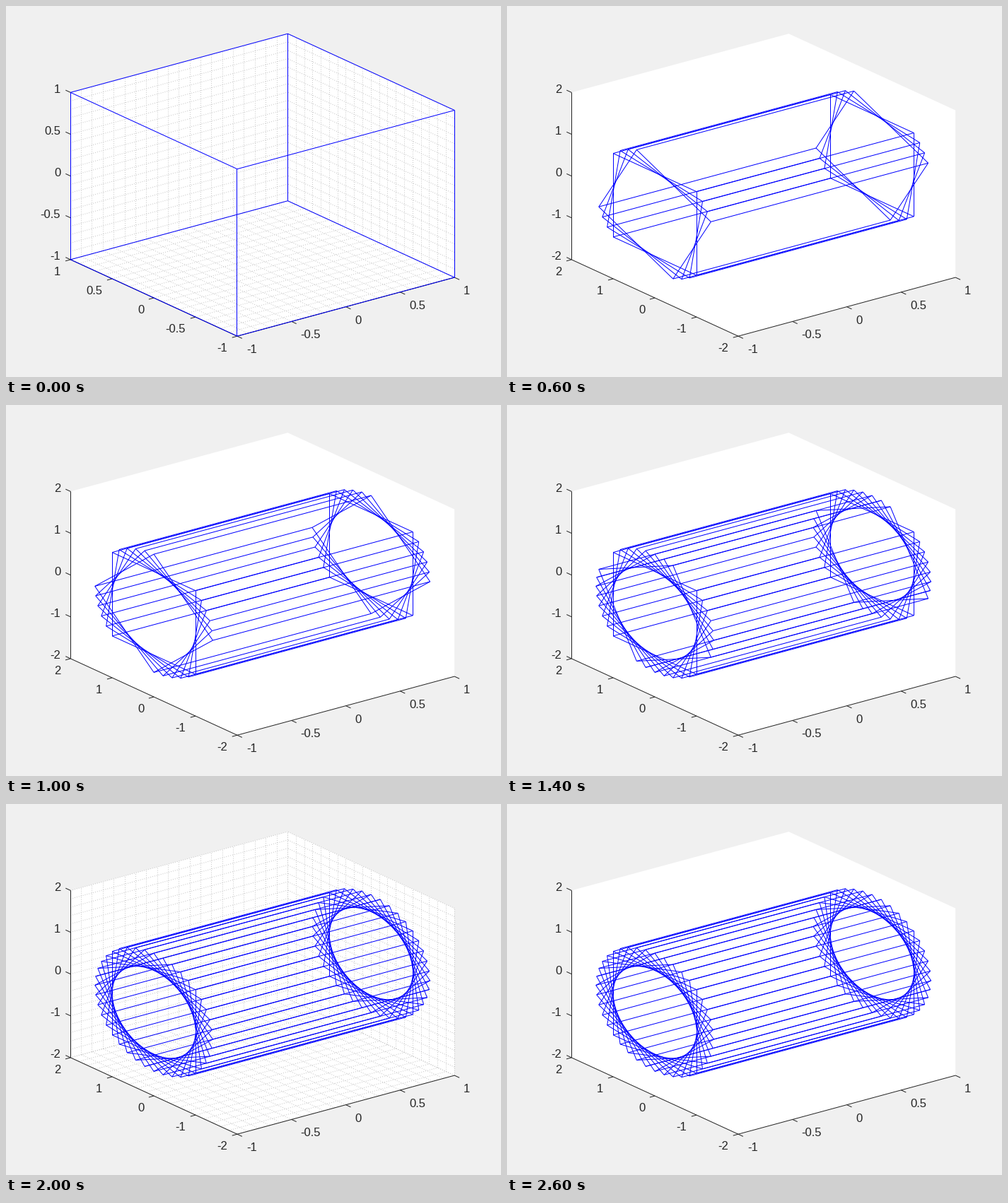
Write a matplotlib script that moves like this. It is 700x525 px and loops after 2800 ms.

```python
import itertools

import matplotlib.pyplot as plt
import numpy as np
from matplotlib.animation import FuncAnimation
from matplotlib.collections import LineCollection

W, H, DPI = 700, 525, 100
FRAMES, INTERVAL = 14, 200
PX = 72 / DPI
STEP = np.radians(9)
INK, BLUE, PAPER = "#262626", "#0000ff", "#f0f0f0"

# Orthographic view of a unit box, stretched to fill the plot area
LEFT, TOP, WIDTH, HEIGHT = 91.2, 39.2, 543.0, 428.0
AZ, EL = np.radians(-37.5), np.radians(30)
right = np.array([np.cos(AZ), np.sin(AZ), 0])
up = np.array([-np.sin(AZ) * np.sin(EL), np.cos(AZ) * np.sin(EL), np.cos(EL)])
right *= WIDTH / np.abs(right).sum()
up *= HEIGHT / up.sum()
VIEW = np.column_stack([right, -up])
ORIGIN = np.array([LEFT - right[1], TOP + HEIGHT])


def project(points):
    """Unit box coordinates to stage pixels."""
    return ORIGIN + np.asarray(points, float) @ VIEW


def crisp(segments):
    """Centre vertical segments on a pixel column."""
    segs = np.array(segments, float)
    vertical = np.isclose(segs[:, 0, 0], segs[:, 1, 0])
    segs[vertical, :, 0] = np.floor(segs[vertical, :, 0]) + 0.5
    return segs


def lines(segments, color, **kw):
    col = LineCollection(segments, colors=color, linewidths=PX, **kw)
    col.set_snap(False)
    ax.add_collection(col)
    return col


def grid_segments():
    segs = []
    for t in np.linspace(0, 1, 21):
        segs += [
            [(t, 0, 0), (t, 1, 0)], [(0, t, 0), (1, t, 0)],
            [(t, 1, 0), (t, 1, 1)], [(0, 1, t), (1, 1, t)],
            [(1, t, 0), (1, t, 1)], [(1, 0, t), (1, 1, t)],
        ]
    return crisp(project(segs))


def axis_segments():
    segs = list(project([
        [(0, 0, 0), (1, 0, 0)],
        [(0, 0, 0), (0, 1, 0)],
        [(0, 1, 0), (0, 1, 1)],
    ]))
    for t in np.linspace(0, 1, 5):
        for start, step in (((t, 0, 0), (6.9, 3.2)),
                            ((0, t, 0), (-7.2, 2.0)),
                            ((0, 1, t), (-6.9, -3.2))):
            p = project(start)
            segs.append([p, p + step])
    return crisp(segs)


CORNERS = np.array(list(itertools.product((-1, 1), repeat=3)), float)
EDGES = [(a, b) for a, b in itertools.combinations(range(8), 2)
         if np.abs(CORNERS[a] - CORNERS[b]).sum() == 2]


def cube_segments(angle, limit):
    """Edges of the cube turned about x, with y and z spanning +-limit."""
    c, s = np.cos(angle), np.sin(angle)
    x, y, z = CORNERS.T
    turned = np.column_stack([x, c * y - s * z, s * y + c * z])
    pts = project((turned / [1, limit, limit] + 1) / 2)
    return crisp([pts[list(edge)] for edge in EDGES])


fig = plt.figure(figsize=(W / DPI, H / DPI), dpi=DPI, facecolor=PAPER)
ax = fig.add_axes([0, 0, 1, 1])
ax.set(xlim=(0, W), ylim=(H, 0))
ax.axis("off")

walls = project([(0, 0, 0), (1, 0, 0), (1, 0, 1),
                 (1, 1, 1), (0, 1, 1), (0, 1, 0)])
ax.fill(*walls.T, color="white", lw=0)
grid = lines(grid_segments(), "#c6c6c6", linestyles=[(0, (1, 2))], zorder=2)
lines(axis_segments(), INK, zorder=3)
cubes = lines([], BLUE, zorder=4)


def label_row(x, y, dx, dy, ha):
    return [ax.text(x + dx * i, y + dy * i, "", ha=ha, va="baseline",
                    family="Liberation Sans", size=12, color=INK)
            for i in range(5)]


x_labels = label_row(339.8, 491.2, 76.8, -20.8, "left")
y_labels = label_row(313, 489.4, -58.9, -27.1, "right")
z_labels = label_row(77.2, 359.4, 0, -59.1, "right")


def set_labels(row, limit):
    for text, value in zip(row, np.linspace(-limit, limit, 5)):
        text.set_text(f"{value:g}")


def update(frame):
    limit = 1 if frame == 0 else 2
    set_labels(x_labels, 1)
    set_labels(y_labels, limit)
    set_labels(z_labels, limit)
    grid.set_visible(frame % 2 == 0)
    # A full quarter turn lands on the first cube again
    turns = range(min(frame + 1, 10))
    cubes.set_segments([seg for k in turns
                        for seg in cube_segments(k * STEP, limit)])
    return [grid, cubes, *x_labels, *y_labels, *z_labels]


anim = FuncAnimation(fig, update, frames=FRAMES, interval=INTERVAL,
                     repeat=True, repeat_delay=0, blit=False)
plt.show()
```
